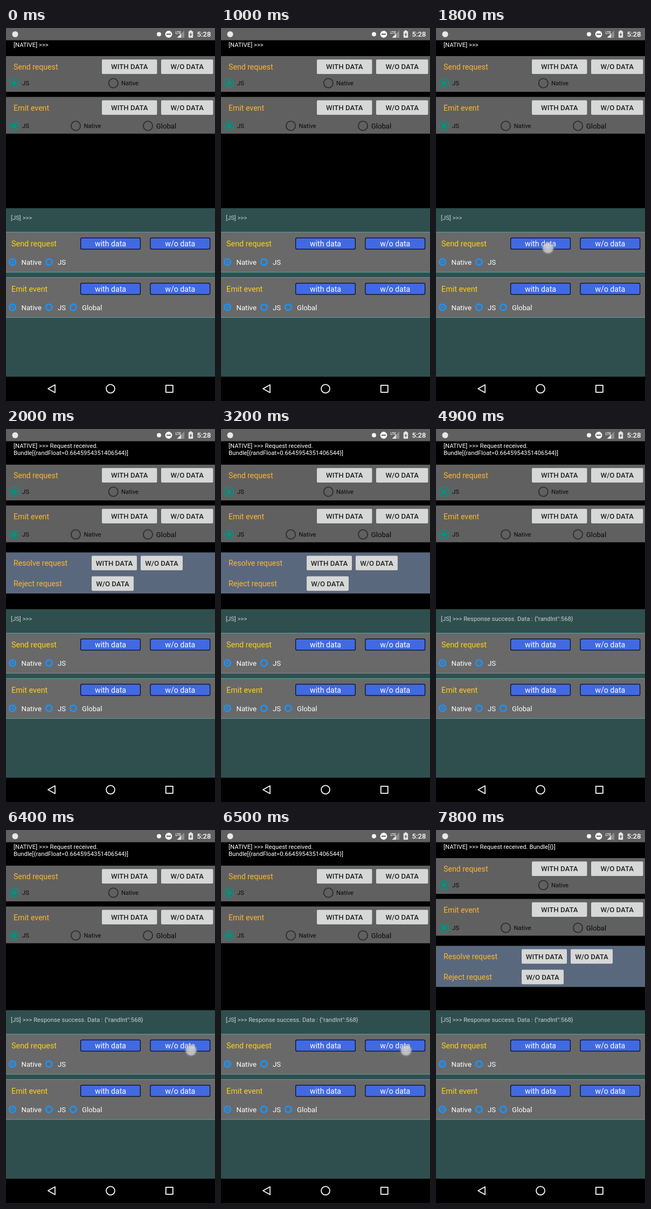
Write an HTML page with a canvas that moves like this. It is 388 px wide and 690 px high and loops after 8000 ms.

```html
<!DOCTYPE html>
<html lang="en">
<head>
<meta charset="utf-8">
<title>Native and JS messaging demo</title>
<style>
  html, body { margin: 0; width: 100%; height: 100%; overflow: hidden; background: #000; }
  canvas { display: block; width: 388px; height: 690px; }
</style>
</head>
<body>
<canvas id="stage"></canvas>
<script>
const W = 388, H = 690, LOOP = 8000;
const canvas = document.getElementById('stage');
const ctx = canvas.getContext('2d');
const dpr = window.devicePixelRatio || 1;
canvas.width = W * dpr;
canvas.height = H * dpr;

// Text sizes: small, body, label
const S = 11.3, M = 13.2, L = 14.14;
const BAR = '#606060', PANEL = '#606060', ORANGE = '#fdb62f', TEAL = '#07917f';
const GOLD = '#ffd012', BLUE = '#2190ef', SLATE = '#2f4f4f';

const TAPS = [
  { x: 208, y: 407, from: 1700, to: 2000 },
  { x: 208, y: 245, from: 3700, to: 4000 },
  { x: 343.5, y: 407.5, from: 6300, to: 6600 }
];

function rect(x, y, w, h, color) {
  ctx.fillStyle = color;
  ctx.fillRect(x, y, w, h);
}

function text(str, x, y, size, color, weight = 400, align = 'left') {
  ctx.font = `${weight} ${size}px Roboto, sans-serif`;
  ctx.textAlign = align;
  ctx.fillStyle = color;
  ctx.fillText(str, x, y);
}

function disc(x, y, r, color) {
  ctx.fillStyle = color;
  ctx.beginPath();
  ctx.arc(x, y, r, 0, 7);
  ctx.fill();
}

function ring(x, y, r, width, color) {
  ctx.strokeStyle = color;
  ctx.lineWidth = width;
  ctx.beginPath();
  ctx.arc(x, y, r, 0, 7);
  ctx.stroke();
}

function shape(points, color) {
  ctx.fillStyle = color;
  ctx.beginPath();
  points.forEach(([x, y]) => ctx.lineTo(x, y));
  ctx.closePath();
  ctx.fill();
}

function box(x, y, w, h, r, color) {
  ctx.fillStyle = color;
  ctx.beginPath();
  ctx.roundRect(x, y, w, h, r);
  ctx.fill();
}

function statusBar() {
  rect(0, 0, W, 22.6, BAR);
  disc(17, 11.5, 5.5, '#e8e8e8');
  disc(284, 11.5, 4, '#f4f4f4');
  disc(302, 11.5, 6.4, '#fff');
  rect(298, 10.4, 8, 2.2, BAR);
  shape([[331, 4.5], [331, 18], [317.5, 18]], '#8d8d8d');
  shape([[325, 10.5], [325, 18], [317.5, 18]], '#e6e6e6');
  text('LTE', 314.5, 10.5, 6.5, '#fff', 500);
  rect(341, 4.5, 4, 2, '#eee');
  box(338.8, 6, 8.4, 12, 1, '#e6e6e6');
  shape([[343.8, 8], [340.5, 12.8], [342.6, 12.8], [342.2, 16.3], [345.5, 11.5], [343.4, 11.5]], BAR);
  text('5:28', 354.5, 16.3, M, '#fff', 500);
}

function navBar() {
  rect(0, 645, W, 45, '#000');
  ctx.strokeStyle = '#fff';
  ctx.lineWidth = 1.7;
  ctx.lineJoin = 'round';
  ctx.beginPath();
  ctx.moveTo(78, 667.3);
  ctx.lineTo(91, 660);
  ctx.lineTo(91, 674.6);
  ctx.closePath();
  ctx.stroke();
  ring(194, 667.3, 7.9, 1.8, '#fff');
  ctx.strokeRect(296.8, 660.8, 13, 13);
}

function nativeButton(label, x, w, cy) {
  box(x, cy - 12.8, w, 27, 2, 'rgba(0,0,0,.3)');
  box(x, cy - 13.5, w, 27, 1.8, '#d6d7d7');
  text(label, x + w / 2, cy + 4.7, M, '#212121', 500, 'center');
}

function nativeRadio(label, x, cy, textX, size, on) {
  ring(x, cy, 8.6, 1.9, on ? TEAL : '#2e2e2e');
  if (on) disc(x, cy, 4.7, TEAL);
  text(label, textX, cy + size * .355, size, '#080808');
}

function nativePanel(title, y, h) {
  rect(0, y, W, h, PANEL);
  text(title, 14, y + 25, L, ORANGE);
  nativeButton('WITH DATA', 178, 102.5, y + 19.7);
  nativeButton('W/O DATA', 288, 96.5, y + 19.7);
}

function replyPanel(y) {
  rect(0, y, W, 76, '#5a687d');
  text('Resolve request', 14, y + 25, L, ORANGE);
  nativeButton('WITH DATA', 159, 84, y + 19.7);
  nativeButton('W/O DATA', 250, 78, y + 19.7);
  text('Reject request', 14, y + 63, L, ORANGE);
  nativeButton('W/O DATA', 159, 78, y + 57.6);
}

function nativeSide(lines, replying) {
  const y = lines.length > 1 ? 14 : 0;
  lines.forEach((line, i) => text(line, 14, 35 + i * 13.3, S, '#fff'));
  nativePanel('Send request', 52 + y, 66);
  nativeRadio('JS', 15, 102 + y, 30, S, true);
  nativeRadio('Native', 199.3, 102 + y, 214, S);
  nativePanel('Emit event', 127.5 + y, 68);
  nativeRadio('JS', 15, 181 + y, 30, S, true);
  nativeRadio('Native', 129.5, 181 + y, 144.5, S);
  nativeRadio('Global', 263.5, 181 + y, 278.7, M);
  if (replying) replyPanel(214.3 + y);
}

function jsButton(label, x, y) {
  box(x, y, 112, 22, 3, '#050a18');
  box(x + 1.2, y + 1.2, 109.6, 19.6, 2, '#4169e1');
  text(label, x + 56, y + 16.5, L, '#fff', 400, 'center');
}

function jsRadio(label, x, cy, textX, on) {
  ring(x, cy, 5.7, 3, BLUE);
  if (on) disc(x, cy, 2.1, BLUE);
  text(label, textX, cy + 4.8, M, '#fff');
}

function jsPanel(title, y) {
  rect(0, y, W, 75, '#696969');
  rect(0, y, W, 1, '#5f9ea0');
  rect(0, y + 74, W, 1, '#5f9ea0');
  text(title, 10, y + 27, 14.4, GOLD);
  jsButton('with data', 138, y + 10.5);
  jsButton('w/o data', 267.3, y + 10.5);
  jsRadio('Native', 12, y + 55.7, 28.5, true);
  jsRadio('JS', 79.8, y + 55.7, 96);
}

function jsSide(log) {
  rect(0, 333.3, W, 312, SLATE);
  text(log, 9, 355, S, '#c9cfcf');
  jsPanel('Send request', 377.2);
  jsPanel('Emit event', 461);
  jsRadio('Global', 124.8, 516.7, 141);
}

function touch({ x, y }) {
  const g = ctx.createRadialGradient(x, y, 0, x, y, 13);
  g.addColorStop(0, 'rgba(225,225,225,.82)');
  g.addColorStop(.66, 'rgba(205,205,205,.8)');
  g.addColorStop(.78, 'rgba(160,160,160,.5)');
  g.addColorStop(1, 'rgba(120,120,120,0)');
  disc(x, y, 13, g);
}

function draw(t) {
  let lines = ['[NATIVE] >>>'];
  if (t >= 6600) lines = ['[NATIVE] >>> Request received. Bundle[{}]'];
  else if (t >= 2000) lines = ['[NATIVE] >>> Request received.', 'Bundle[{randFloat=0.6645954351406544}]'];
  const replying = t >= 2000 && t < 3900 || t >= 6600;
  const log = t < 4000 ? '[JS] >>>' : '[JS] >>> Response success. Data : {"randInt":568}';

  ctx.setTransform(dpr, 0, 0, dpr, 0, 0);
  rect(0, 0, W, H, '#000');
  statusBar();
  nativeSide(lines, replying);
  jsSide(log);
  navBar();
  TAPS.filter(tap => t >= tap.from && t < tap.to).forEach(touch);
}

const start = performance.now();
function tick() {
  draw((performance.now() - start) % LOOP);
  requestAnimationFrame(tick);
}
tick();
</script>
</body>
</html>
```
